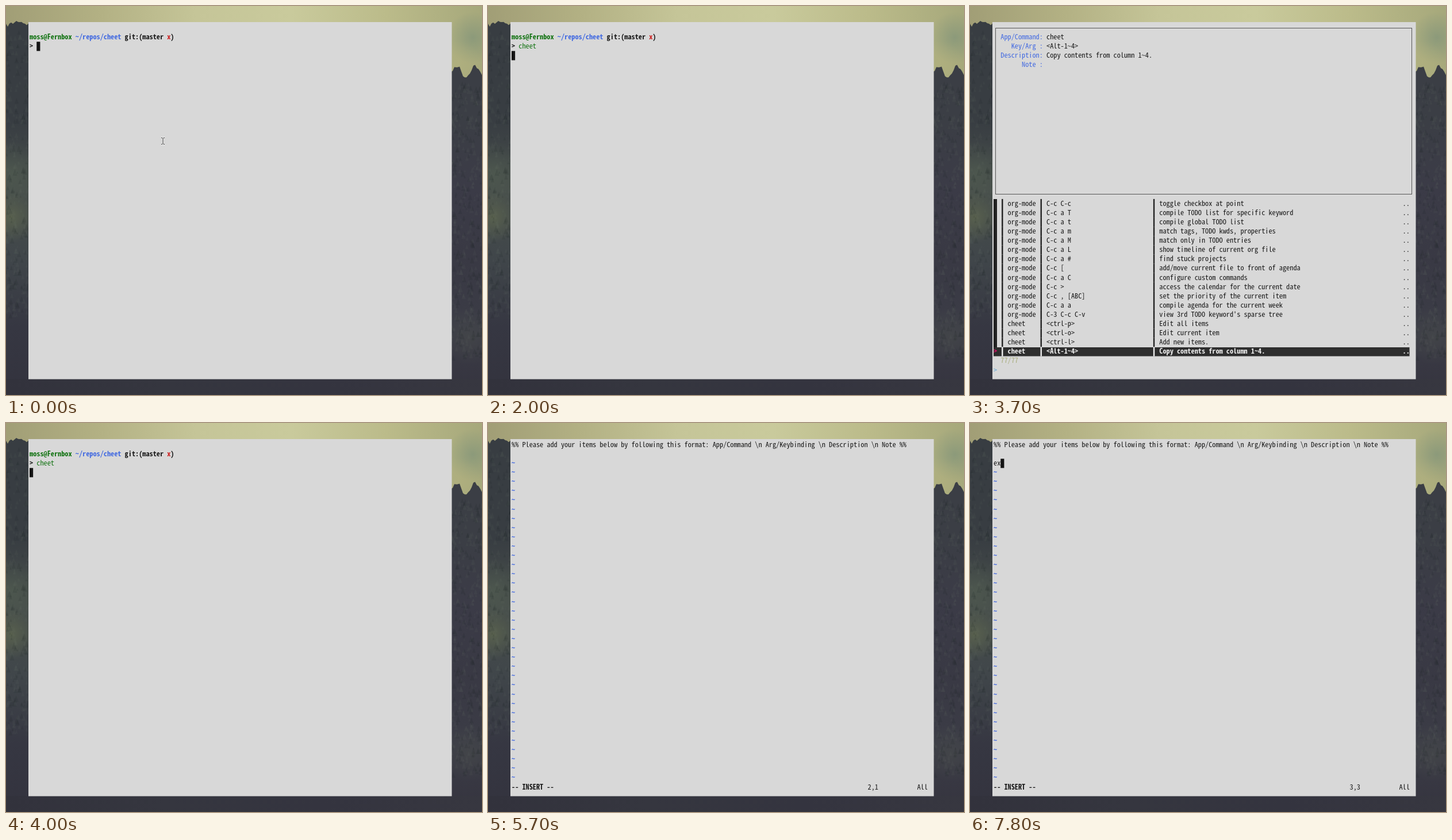
An HTML page with a canvas for the animation above (8 s loop, 828 px wide and 677 px high).

```html
<!DOCTYPE html>
<html lang="en">
<head>
<meta charset="utf-8">
<title>Terminal cheat sheet</title>
<style>
  html, body { margin: 0; width: 100%; height: 100%; overflow: hidden; background: #34343f; }
  canvas { display: block; }
</style>
</head>
<body>
<canvas id="stage" width="828" height="677"></canvas>
<script>
const ctx = document.getElementById('stage').getContext('2d');
const LOOP = 8000;
const CELL_W = 6.134, CELL_H = 16.1, LEFT = 41, TOP = 30;
const FAMILY = '"Noto Sans Mono CJK SC", "Noto Sans Mono CJK JP", "Noto Sans Mono", monospace';
const INK = '#181818', PAPER = '#d8d8d8', BLUE = '#4169e1', GREEN = '#107210', RED = '#cc2020';

// Choose the font size whose natural advance equals one cell.
ctx.font = `100px ${FAMILY}`;
const fontSize = CELL_W * 100 / ctx.measureText('M').width;

const colX = col => LEFT + col * CELL_W;
const rowY = row => TOP + row * CELL_H;

function rect(x, y, w, h, color) {
  ctx.fillStyle = color;
  ctx.fillRect(x, y, w, h);
}

function text(col, row, string, color = INK, bold = false) {
  ctx.font = `${bold ? 'bold ' : ''}${fontSize}px ${FAMILY}`;
  ctx.fillStyle = color;
  const baseline = Math.round(rowY(row) + 11.8);
  [...string].forEach((char, i) => {
    if (char !== ' ') ctx.fillText(char, colX(col + i), baseline);
  });
}

function cursor(col, row, char = '') {
  rect(colX(col), rowY(row), CELL_W, CELL_H, '#141414');
  text(col, row, char, PAPER);
}

/* ---------- wallpaper ---------- */

function gradient(x0, y0, x1, y1, colors) {
  const g = ctx.createLinearGradient(x0, y0, x1, y1);
  colors.forEach((color, i) => g.addColorStop(i / (colors.length - 1), color));
  return g;
}

function glow(x, y, radius, rgb, alpha) {
  const g = ctx.createRadialGradient(x, y, 0, x, y, radius);
  g.addColorStop(0, `rgba(${rgb},${alpha})`);
  g.addColorStop(1, `rgba(${rgb},0)`);
  rect(x - radius, y - radius, radius * 2, radius * 2, g);
}

function paintWallpaper() {
  let seed = 7;
  const random = () => (seed = seed * 16807 % 2147483647) / 2147483647;

  rect(0, 0, 828, 677, '#34343f');
  rect(0, 0, 828, 130, gradient(0, 0, 828, 0, ['#a19e76', '#b3b184', '#c5c598', '#c9ca9c', '#bbbb8a', '#a6a87b']));
  glow(812, 55, 45, '112,138,120', 0.5);
  glow(785, 105, 45, '178,177,126', 0.5);

  // Tree lines on both sides, then the dark hills beneath them.
  const hill = (x0, x1, top, color) => {
    ctx.fillStyle = color;
    ctx.beginPath();
    ctx.moveTo(x0, 250);
    for (let x = x0; x <= x1; x += 3) ctx.lineTo(x, top(x) + random() * 7);
    ctx.lineTo(x1, 250);
    ctx.fill();
  };
  hill(0, 42, x => 22 + Math.abs(x - 22) * 0.4, '#383d42');
  hill(768, 831, x => 110 - 10 * Math.cos((x - 784) / 5), '#3b3e45');
  rect(0, 200, 40, 477, gradient(0, 200, 0, 677, ['#383d42', '#474e4b', '#40464a', '#363742', '#33333e']));
  rect(774, 200, 54, 477, gradient(0, 200, 0, 677, ['#3b3e45', '#3b3b47', '#393944', '#3b3c46', '#35343f']));
  glow(10, 290, 55, '94,110,88', 0.35);
  glow(8, 368, 45, '112,122,82', 0.45);
  glow(805, 575, 50, '86,92,82', 0.3);

  for (let i = 0; i < 700; i++) {
    const left = random() < 0.42;
    const x = left ? random() * 40 : 774 + random() * 54;
    const y = (left ? 45 : 135) + random() * (left ? 495 : 480);
    const size = 2 + random() * 4;
    ctx.fillStyle = random() < 0.5 ? 'rgba(25,30,34,.12)' : 'rgba(120,130,115,.08)';
    ctx.beginPath();
    ctx.moveTo(x, y - size);
    ctx.lineTo(x + size * 0.7, y + size);
    ctx.lineTo(x - size * 0.7, y + size);
    ctx.fill();
  }
  rect(0, 649, 828, 28, gradient(0, 0, 828, 0, ['#32323c', '#35363f', '#34343f', '#373740']));

  // Soft right and bottom edge of the window.
  rect(39, 28, 736.5, 621.5, PAPER);
}

/* ---------- screens ---------- */

function drawMouse() {
  const beam = (color, width) => {
    ctx.strokeStyle = color;
    ctx.lineWidth = width;
    ctx.stroke(new Path2D('M270 229.5h2l1 1l1-1h2M273 230.5v9M270 240.5h2l1-1l1 1h2'));
  };
  beam('#f4f4f4', 2.4);
  beam('#333', 1);
}

function drawShell(command, color, bold) {
  text(0, 1, 'moss@Fernbox', GREEN, true);
  text(13, 1, '~/repos/cheet', BLUE, true);
  text(27, 1, 'git:(master', INK, true);
  text(39, 1, 'x', RED, true);
  text(40, 1, ')', INK, true);
  text(0, 2, '>', INK, true);
  text(2, 2, command, color, bold);
}

const DETAILS = [
  ['App/Command:', 'cheet'],
  ['   Key/Arg :', '<Alt-1~4>'],
  ['Description:', 'Copy contents from column 1~4.'],
  ['      Note :', '']
];
const ITEMS = [
  ['org-mode', 'C-c C-c', 'toggle checkbox at point'],
  ['org-mode', 'C-c a T', 'compile TODO list for specific keyword'],
  ['org-mode', 'C-c a t', 'compile global TODO list'],
  ['org-mode', 'C-c a m', 'match tags, TODO kwds, properties'],
  ['org-mode', 'C-c a M', 'match only in TODO entries'],
  ['org-mode', 'C-c a L', 'show timeline of current org file'],
  ['org-mode', 'C-c a #', 'find stuck projects'],
  ['org-mode', 'C-c [', 'add/move current file to front of agenda'],
  ['org-mode', 'C-c a C', 'configure custom commands'],
  ['org-mode', 'C-c >', 'access the calendar for the current date'],
  ['org-mode', 'C-c , [ABC]', 'set the priority of the current item'],
  ['org-mode', 'C-c a a', 'compile agenda for the current week'],
  ['org-mode', 'C-3 C-c C-v', "view 3rd TODO keyword's sparse tree"],
  ['cheet', '<ctrl-p>', 'Edit all items'],
  ['cheet', '<ctrl-o>', 'Edit current item'],
  ['cheet', '<ctrl-l>', 'Add new items.'],
  ['cheet', '<Alt-1~4>', 'Copy contents from column 1~4.']
];

function drawFinder() {
  ctx.strokeStyle = '#555';
  ctx.lineWidth = 1;
  ctx.strokeRect(44.5, 38.5, 724, 289);
  DETAILS.forEach(([label, value], i) => {
    text(2, i + 1, label, BLUE);
    text(15, i + 1, value);
  });
  rect(LEFT, 336, 6, 258, '#222');
  ITEMS.forEach(([app, key, description], i) => {
    const row = 19 + i, selected = i === ITEMS.length - 1;
    const color = selected ? '#eee' : INK;
    if (selected) {
      rect(LEFT, 594, 723.5, 15.5, '#2e2e2e');
      text(0, row, '>', '#e8106c', true);
    }
    for (const col of [2, 13, 45]) {
      rect(colX(col) + 1.8, rowY(row), 2.4, CELL_H, selected ? '#eee' : '#222');
    }
    text(4, row, app, color, selected);
    text(15, row, key, color, selected);
    text(47, row, description, color, selected);
    text(116, row, '..', color, selected);
  });
  text(2, 36, '77/77', '#a8ad7c');
  text(0, 37, '>', '#5fa8d8');
}

function drawEditor(lineCount, typed, position, inserting) {
  text(0, 0, '%% Please add your items below by following this format: ' +
    'App/Command \\n Arg/Keybinding \\n Description \\n Note %%');
  text(0, 2, typed);
  for (let row = lineCount; row < 37; row++) text(0, row, '~', BLUE, true);
  if (inserting) text(0, 37, '-- INSERT --', INK, true);
  else text(0, 37, '"/tmp/cheet" 1L, 113C');
  text(101, 37, position);
  text(115, 37, 'All');
}

/* ---------- timeline ---------- */

function drawScreen(t) {
  if (t < 2100) {
    const length = t < 600 ? 0 : Math.min(5, 1 + Math.floor((t - 600) / 200));
    const known = length === 5;
    drawShell('cheet'.slice(0, length), known ? GREEN : RED, !known);
    if (t < 600) drawMouse();
    if (t < 1900) cursor(2 + length, 2);
    else if (t >= 2000) cursor(0, 3);
  } else if (t < 4000) {
    drawFinder();
    if (t < 3000 || (t >= 3100 && t < 3700)) cursor(2, 37);
  } else if (t < 4100) {
    drawShell('cheet', GREEN, false);
    cursor(0, 3);
  } else if (t < 5100) {
    drawEditor(1, '', '1,1', false);
    if (t < 4500) cursor(0, 0, '%');
  } else if (t < 5900) {
    drawEditor(2, '', '2,1', true);
    if (t < 5700) cursor(0, 1);
  } else {
    const retyping = t >= 7600 && t < 7800;
    const length = t < 6400 ? 0 : t < 6600 || retyping ? 1 : 2;
    drawEditor(3, 'ex'.slice(0, length), `3,${length + 1}`, true);
    if (t < 7200 || t >= 7600) cursor(length, 2);
  }
}

function frame() {
  rect(39, 28, 736, 621, PAPER);
  drawScreen(performance.now() % LOOP);
  requestAnimationFrame(frame);
}

paintWallpaper();
frame();
</script>
</body>
</html>
```
